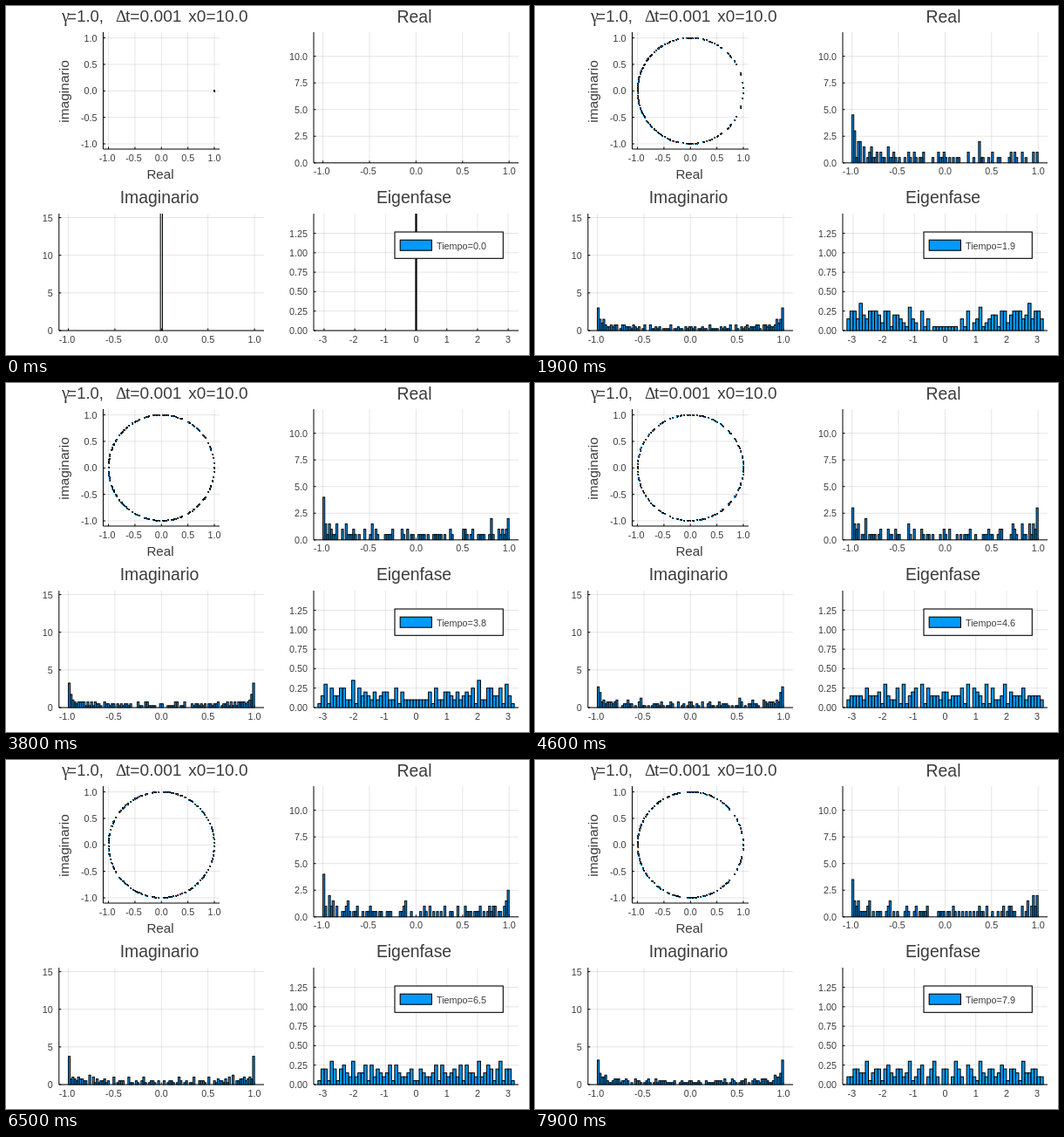
An HTML page with a canvas that plays this animation: 600x400 px, repeating every 8 s.

```html
<!DOCTYPE html>
<html lang="es">
<head>
<meta charset="utf-8">
<style>
html, body { margin: 0; width: 600px; height: 400px; overflow: hidden; background: #fff; }
canvas { display: block; }
</style>
</head>
<body>
<canvas id="stage" width="600" height="400"></canvas>
<script>
const ctx = document.getElementById('stage').getContext('2d');
const SANS = '"Liberation Sans", Arial, sans-serif';
const SERIF = '"Liberation Serif", serif';
const BLUE = '#009afa', INK = '#3c3c3c', GRID = 'rgba(0,0,0,.1)';
const PAIRS = 100, LOOP = 8000, STEP = 100;

let seed = 7;
const random = () => (seed = seed * 16807 % 2147483647) / 2147483647;
const particles = Array.from({length: PAIRS}, (_, i) => ({
  rank: (i + random()) / PAIRS,
  shift: random() * 2 * Math.PI,
  speed: 2 + 3 * random()
}));

// The gas spreads as reach * rank ^ power: it bursts out, piles up at pi and relaxes
const spread = [
  {t: 0, reach: 0.011, power: 0},
  {t: 0.6, reach: 2.3, power: 0.75},
  {t: 0.9, reach: Math.PI, power: 0.45},
  {t: 1.2, reach: Math.PI, power: 0.26},
  {t: 1.9, reach: Math.PI, power: 0.62},
  {t: 3.1, reach: Math.PI, power: 0.72},
  {t: 4.6, reach: Math.PI, power: 1},
  {t: 5.7, reach: Math.PI, power: 1},
  {t: 7.2, reach: Math.PI, power: 0.8},
  {t: 7.9, reach: Math.PI, power: 0.92}
];

function phasesAt(t) {
  const next = Math.max(1, spread.findIndex(s => s.t >= t));
  const a = spread[next - 1], b = spread[next];
  const u = (t - a.t) / (b.t - a.t);
  const reach = a.reach + (b.reach - a.reach) * u;
  const power = a.power + (b.power - a.power) * u;
  const noise = Math.min(1, t / 2);
  return particles.flatMap(({rank, shift, speed}) => {
    const wave = 0.025 * Math.sin(55 * rank + 2 * t) + 0.015 * Math.sin(97 * rank - 3 * t);
    const jitter = 0.05 * Math.sin(shift + speed * t);
    const raw = Math.abs(reach * rank ** power + noise * (wave + jitter));
    const phase = Math.min(raw, 2 * Math.PI - raw);
    return [phase, -phase];
  });
}

const ticks = (from, to, step, digits) =>
  Array.from({length: Math.round((to - from) / step) + 1}, (_, i) => (from + i * step).toFixed(digits));

// Each plot: frame, position of the origin, pixels per unit and tick labels
const unit = ticks(-1, 1, 0.5, 1);
const plots = {
  circle: {left: 111.5, right: 245, top: 30, bottom: 164, x0: 178.3, y0: 97.3, sx: 60.7, sy: 60.7,
    xt: unit, yt: unit},
  real: {left: 353, right: 588, top: 30, bottom: 179.8, x0: 470.4, y0: 179.8, sx: 106.8, sy: 12.22,
    xt: unit, yt: ticks(0, 10, 2.5, 1)},
  imag: {left: 60.8, right: 296, top: 238, bottom: 372, x0: 178.3, y0: 372, sx: 106.8, sy: 8.63,
    xt: unit, yt: ticks(0, 15, 5, 0)},
  phase: {left: 353, right: 588, top: 238, bottom: 372, x0: 470.5, y0: 372, sx: 35.2, sy: 89.2,
    xt: ticks(-3, 3, 1, 0), yt: ticks(0, 1.25, 0.25, 2)}
};

function text(str, x, y, size, align = 'center', family = SANS) {
  ctx.font = `${size}px ${family}`;
  ctx.textAlign = align;
  ctx.fillStyle = INK;
  ctx.fillText(str, x, y);
}

function line(x1, y1, x2, y2, color) {
  ctx.strokeStyle = color;
  ctx.beginPath();
  ctx.moveTo(x1, y1);
  ctx.lineTo(x2, y2);
  ctx.stroke();
}

function box(x, y, w, h, fill) {
  ctx.fillStyle = fill;
  ctx.strokeStyle = '#000';
  ctx.fillRect(x, y, w, h);
  ctx.strokeRect(x, y, w, h);
}

function drawAxes({left, right, top, bottom, x0, y0, sx, sy, xt, yt}) {
  ctx.lineWidth = 1;
  for (const label of xt) {
    const x = x0 + label * sx;
    line(x, top, x, bottom, GRID);
    line(x, bottom, x, bottom - 2.5, '#000');
    text(label, x - (label < 0 ? 1.5 : 0), bottom + 13.5, 10.8);
  }
  for (const label of yt) {
    const y = y0 - label * sy;
    line(left, y, right, y, GRID);
    line(left, y, left + 2.5, y, '#000');
    text(label, left - 7, y + 4, 10.8, 'right');
  }
  line(left, top, left, bottom, '#000');
  line(left, bottom, right, bottom, '#000');
}

// Smallest 1, 2 or 5 times a power of ten that gives at most 100 bins
function binWidth(range) {
  const least = range / 100, base = 10 ** Math.floor(Math.log10(least));
  return base * [1, 2, 5, 10].find(m => m * base >= least * 0.9999);
}

function drawHistogram(p, values) {
  const range = Math.max(...values) - Math.min(...values);
  if (range < 1e-9) return;
  const width = binWidth(range), counts = new Map();
  for (const v of values) {
    const bin = Math.floor(v / width);
    counts.set(bin, (counts.get(bin) || 0) + 1);
  }
  ctx.save();
  ctx.beginPath();
  ctx.rect(p.left, p.top, p.right - p.left, p.bottom - p.top + 0.5);
  ctx.clip();
  ctx.lineWidth = 1;
  for (const [bin, n] of counts) {
    const h = n / (values.length * width) * p.sy;
    box(p.x0 + bin * width * p.sx, p.y0 - h, width * p.sx, h, BLUE);
  }
  ctx.restore();
}

// Tiny markers snapped to whole pixels: a black outline with a speck of fill
function drawPoints(p, phases) {
  for (const a of phases) {
    const x = Math.round(p.x0 + Math.cos(a) * p.sx) - 1;
    const y = Math.round(p.y0 - Math.sin(a) * p.sy) - 1;
    ctx.fillStyle = '#000';
    ctx.fillRect(x, y, 2, 2);
    ctx.fillStyle = BLUE;
    ctx.fillRect(x, y + 1, 1, 1);
  }
}

function drawLabels(t) {
  text('γ', 64, 18, 20, 'left', SERIF);
  text('=1.0,', 112, 18, 18.5, 'right');
  text('Δ', 126, 18, 19.3, 'left', SERIF);
  text('t=0.001', 201.5, 18, 19.2, 'right');
  text('x0=10.0', 277.5, 18, 19, 'right');
  text('Real', 468.5, 18.5, 19.4);
  text('Imaginario', 176, 226, 19.4);
  text('Eigenfase', 468, 226, 19.4);
  text('Real', 177, 197.5, 15.2);
  ctx.save();
  ctx.translate(72, 98);
  ctx.rotate(-Math.PI / 2);
  text('imaginario', 0, 0, 15.5);
  ctx.restore();

  ctx.lineWidth = 1.1;
  box(446, 259, 124.3, 30.3, '#fff');
  box(452.2, 268.2, 36.2, 12, BLUE);
  text('Tiempo=' + t.toFixed(1), 494, 279, 10.8, 'left');
}

function render() {
  const t = Math.floor(performance.now() % LOOP / STEP) * STEP / 1000;
  const phases = phasesAt(t);
  ctx.fillStyle = '#fff';
  ctx.fillRect(0, 0, 600, 400);
  Object.values(plots).forEach(drawAxes);
  drawPoints(plots.circle, phases);
  drawHistogram(plots.real, phases.map(Math.cos));
  drawHistogram(plots.imag, phases.map(Math.sin));
  drawHistogram(plots.phase, phases);
  drawLabels(t);
  requestAnimationFrame(render);
}
render();
</script>
</body>
</html>
```
